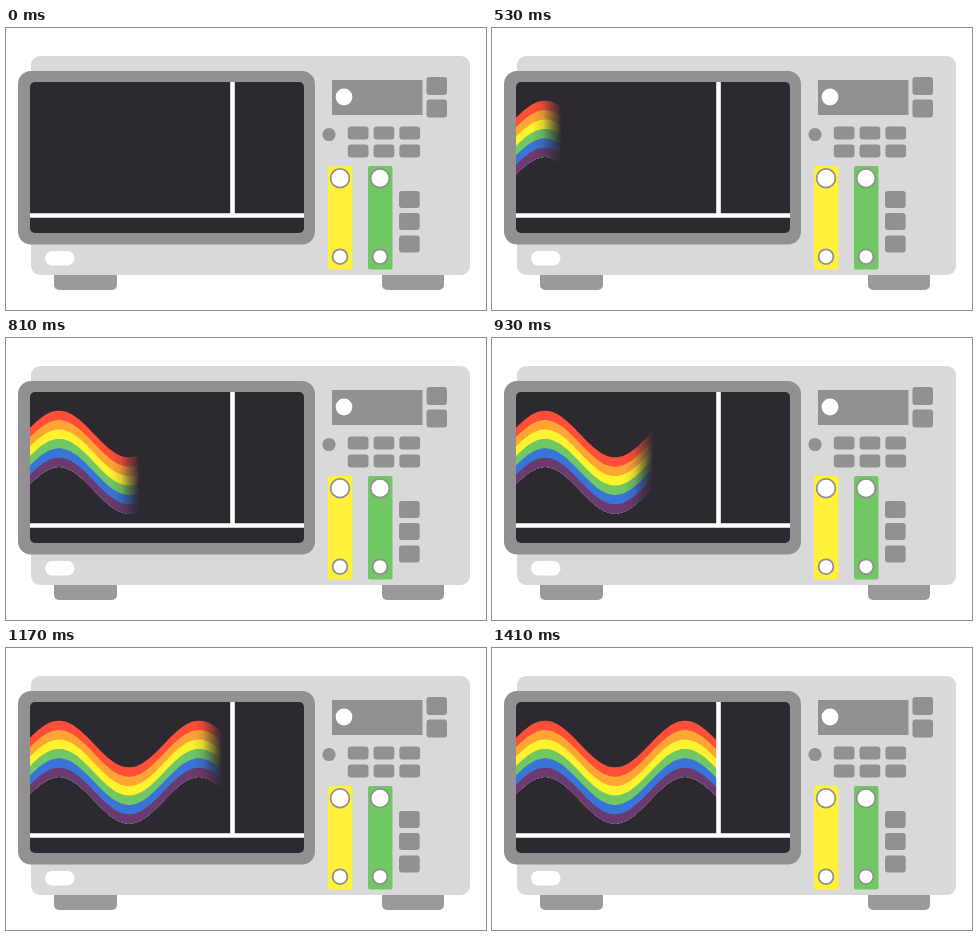
Animation of 480 by 282 pixels, one loop 1.99 s. Source, as an HTML page:

```html
<!DOCTYPE html>
<html lang="en">
<head>
<meta charset="utf-8">
<title>Rainbow oscilloscope</title>
<style>
html, body { margin: 0; width: 100%; height: 100%; overflow: hidden; background: #fff; }
svg { display: block; width: 480px; height: 282px; }
</style>
</head>
<body>
<svg viewBox="0 0 480 282">
  <defs>
    <linearGradient id="fade" gradientUnits="userSpaceOnUse" x1="0" x2="30" y1="0" y2="0">
      <stop offset="0" stop-color="#fff"/>
      <stop offset=".35" stop-color="#fff" stop-opacity=".85"/>
      <stop offset=".7" stop-color="#fff" stop-opacity=".38"/>
      <stop offset="1" stop-color="#fff" stop-opacity="0"/>
    </linearGradient>
    <mask id="wipe" maskUnits="userSpaceOnUse" x="24" y="54" width="202" height="130">
      <rect x="24" y="54" width="202" height="130" fill="url(#fade)"/>
    </mask>
  </defs>
  <g id="case" fill="#929090"></g>
  <g id="wave" mask="url(#wipe)"></g>
  <path d="M226.5 54V188M24 187.5H298" fill="none" stroke="#fff" stroke-width="4.6"/>
</svg>
<script>
const NS = 'http://www.w3.org/2000/svg';
const $ = id => document.getElementById(id);
const box = $('case'), wave = $('wave'), fade = $('fade');

function add(parent, tag, attrs) {
  const el = document.createElementNS(NS, tag);
  for (const key in attrs) el.setAttribute(key, attrs[key]);
  parent.append(el);
}

const rect = (x, y, width, height, rx, fill = '#929090') =>
  add(box, 'rect', { x, y, width, height, rx, fill });
const dot = (cx, cy, r, fill = '#fff', stroke = 'none') =>
  add(box, 'circle', { cx, cy, r, fill, stroke, 'stroke-width': 1.8 });

// Feet, body and screen
rect(48, 240, 63, 22, 5, '#9b9a9a');
rect(376, 240, 62, 22, 5, '#9b9a9a');
rect(25, 28, 439, 219, 9, '#d9d9d9');
rect(12, 43, 297, 173.5, 13);
rect(24, 54, 274, 151, 5, '#2d2931');
rect(39, 223, 29.5, 14.5, 7.25, '#fff');

// Controls
rect(326, 52, 90.5, 35, 0);
dot(338, 69, 8.4);
for (const y of [49, 71.5]) rect(420.5, y, 20.5, 18, 3);
dot(323, 106.5, 6.6, '#929090');
for (const y of [98.5, 116.5])
  for (const x of [341.8, 367.6, 393.4]) rect(x, y, 20.7, 13, 3);
for (const y of [163, 185, 207.5]) rect(393, y, 20.7, 17, 3);

// Input channels
for (const [x, color] of [[322, '#fff03a'], [362, '#70c763']]) {
  rect(x, 138, 24.5, 103.5, 2, color);
  dot(x + 12, 150.3, 9.4, '#fff', '#929090');
  dot(x + 12, 228.7, 7.4, '#fff', '#929090');
}

// Rainbow: one cosine curve, repeated downwards
const BAND = 9.4;
const curve = x => 96 - 23.3 * Math.cos((x - 53) * 2 * Math.PI / 140);
['#ff4f38', '#ffa534', '#fff22e', '#70c763', '#3875d6', '#6b3a70'].forEach((fill, i, all) => {
  const edge = [], back = [];
  for (let x = 24; x <= 226; x += 2) {
    const top = curve(x) + i * BAND;
    const bottom = curve(x) + all.length * BAND;
    edge.push(`${x} ${top.toFixed(2)}`);
    back.unshift(`${x} ${bottom.toFixed(2)}`);
  }
  add(wave, 'path', { d: `M${edge.join('L')}L${back.join('L')}Z`, fill });
});

// The soft front advances once per 40 ms step
const LOOP = 1990, START = 370, STEP = 40, LAST = 26;
const start = performance.now();

function draw(now) {
  const t = Math.max(0, now - start) % LOOP;
  const step = Math.min(LAST, Math.floor((t - START) / STEP));
  wave.style.display = step < 0 ? 'none' : '';
  const front = 33 + 9.15 * step;
  fade.setAttribute('x1', front - 29);
  fade.setAttribute('x2', front);
  requestAnimationFrame(draw);
}
draw(start);
</script>
</body>
</html>
```
